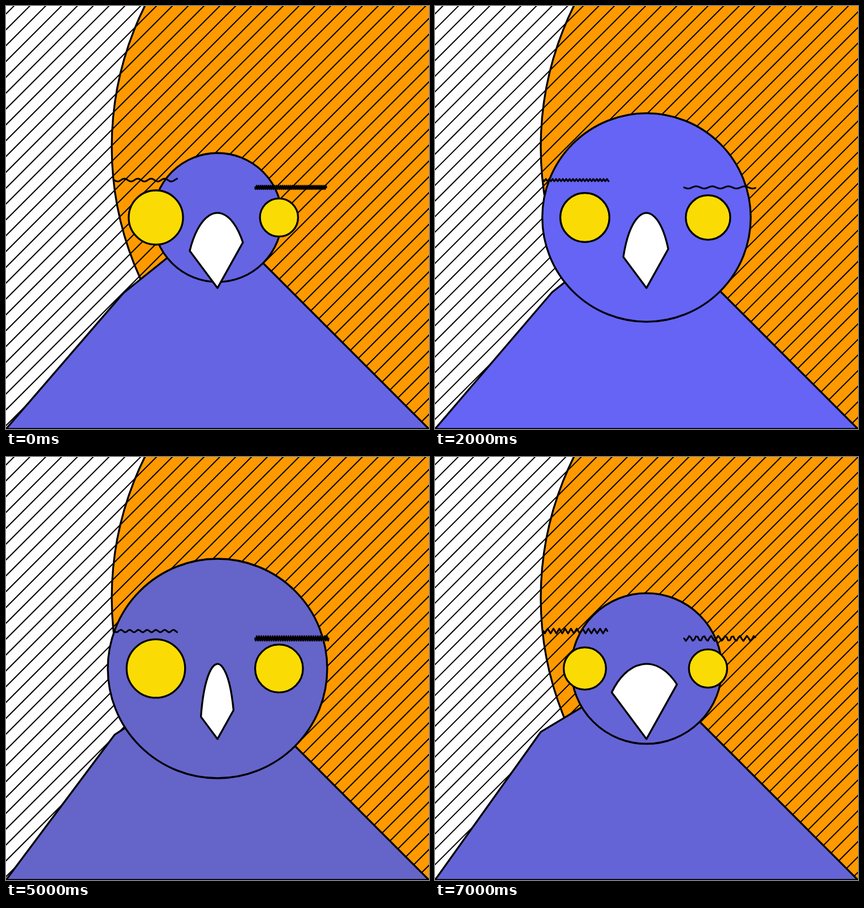
An HTML page with a canvas that plays this animation: 748 by 748 pixels, repeating every 8 s.

```html
<!DOCTYPE html>
<html lang="en">
<head>
<meta charset="utf-8">
<title>Bird</title>
<style>
  html, body { margin: 0; width: 100%; height: 100%; overflow: hidden; background: #fff; }
  canvas { display: block; width: 748px; height: 748px; }
</style>
</head>
<body>
<canvas id="stage" width="748" height="748"></canvas>
<script>
const SIZE = 748, MID = SIZE / 2, HOLD = 1000;
const ctx = document.getElementById('stage').getContext('2d');

// brows: [period, amplitude, right end] for left and right
const poses = [
  { head: 114,   blue: 227, eyes: [48, 33.7],   beak: 56.5, neck: 208, gap: 28,    brows: [[23.7, 2.6, 304], [3.5, 3, 567]] },
  { head: 160,   blue: 218, eyes: [46, 40],     beak: 62,   neck: 196, gap: 29,    brows: [[12, 3, 306], [14, 3, 563]] },
  { head: 184.3, blue: 245, eyes: [43.4, 39.3], beak: 45,   neck: 207, gap: 27.58, brows: [[6, 2, 308], [28.5, 2, 569]] },
  { head: 160.7, blue: 201, eyes: [55, 42.9],   beak: 72.4, neck: 186, gap: 32.6,  brows: [[30, 4.2, 306], [28.2, 4.5, 553]] },
  { head: 165,   blue: 212, eyes: [48, 40],     beak: 60,   neck: 196, gap: 29,    brows: [[16, 3, 306], [10, 3, 563]] },
  { head: 194,   blue: 201, eyes: [51.7, 42.3], beak: 30.7, neck: 192, gap: 28,    brows: [[15.5, 2.3, 305], [4, 4, 571]] },
  { head: 194.5, blue: 228, eyes: [45.3, 46],   beak: 97.9, neck: 185, gap: 30,    brows: [[10.2, 2.4, 307], [14.5, 2, 556]] },
  { head: 133.2, blue: 214, eyes: [37.4, 33.8], beak: 78.4, neck: 187, gap: 27.2,  brows: [[10.3, 4.2, 306], [12.7, 4.5, 569]] }
];

function paint(fill, width = 3.3) {
  if (fill) {
    ctx.fillStyle = fill;
    ctx.fill();
  }
  ctx.lineWidth = width;
  ctx.stroke();
}

function disc(x, y, r, fill) {
  ctx.beginPath();
  ctx.arc(x, y, r, 0, Math.PI * 2);
  paint(fill);
}

function hatch(gap) {
  ctx.beginPath();
  for (let d = gap / 2; d < SIZE * 2; d += gap) {
    ctx.moveTo(-5, d + 5);
    ctx.lineTo(d + 5, -5);
  }
  paint(null, 2);
}

function body(neck, fill) {
  ctx.beginPath();
  ctx.moveTo(0, SIZE);
  ctx.lineTo(neck, neck + SIZE * 0.4);
  ctx.lineTo(MID, MID);
  ctx.lineTo(SIZE, SIZE);
  ctx.closePath();
  paint(fill);
}

// Slice of an ellipse centred on the beak's tip
function beak(rx) {
  const tip = SIZE * 2 / 3, ry = 132.7;
  const angle = (dx, slope) => Math.atan2(-slope / ry, dx / rx);
  ctx.beginPath();
  ctx.moveTo(MID, tip);
  ctx.ellipse(MID, tip, rx, ry, 0, angle(-1, 1.34), angle(1, 1.795));
  ctx.closePath();
  paint('#fff');
}

function brow(x, y, [period, amp, end]) {
  const step = Math.min(3, period / 4);
  ctx.beginPath();
  for (let px = x; px <= end; px += step) {
    ctx.lineTo(px, y + amp * Math.sin((px - x) / period * Math.PI * 2));
  }
  paint(null, 3);
}

function draw(p) {
  const skin = `rgb(101,100,${p.blue})`;
  ctx.fillStyle = '#fff';
  ctx.fillRect(0, 0, SIZE, SIZE);
  ctx.strokeStyle = '#000';
  ctx.lineJoin = ctx.lineCap = 'round';
  disc(SIZE, SIZE / 3, SIZE * 0.75, '#ff9900');
  hatch(p.gap);
  body(p.neck, skin);
  disc(MID, MID, p.head, skin);
  disc(265, MID, p.eyes[0], '#fadc04');
  disc(482.8, MID, p.eyes[1], '#fadc04');
  beak(p.beak);
  brow(191.5, 307.8, p.brows[0]);
  brow(440.5, 320.8, p.brows[1]);
}

let shown = -1;
function tick() {
  const i = Math.floor(performance.now() / HOLD) % poses.length;
  if (i !== shown) draw(poses[shown = i]);
  requestAnimationFrame(tick);
}
tick();
</script>
</body>
</html>
```
